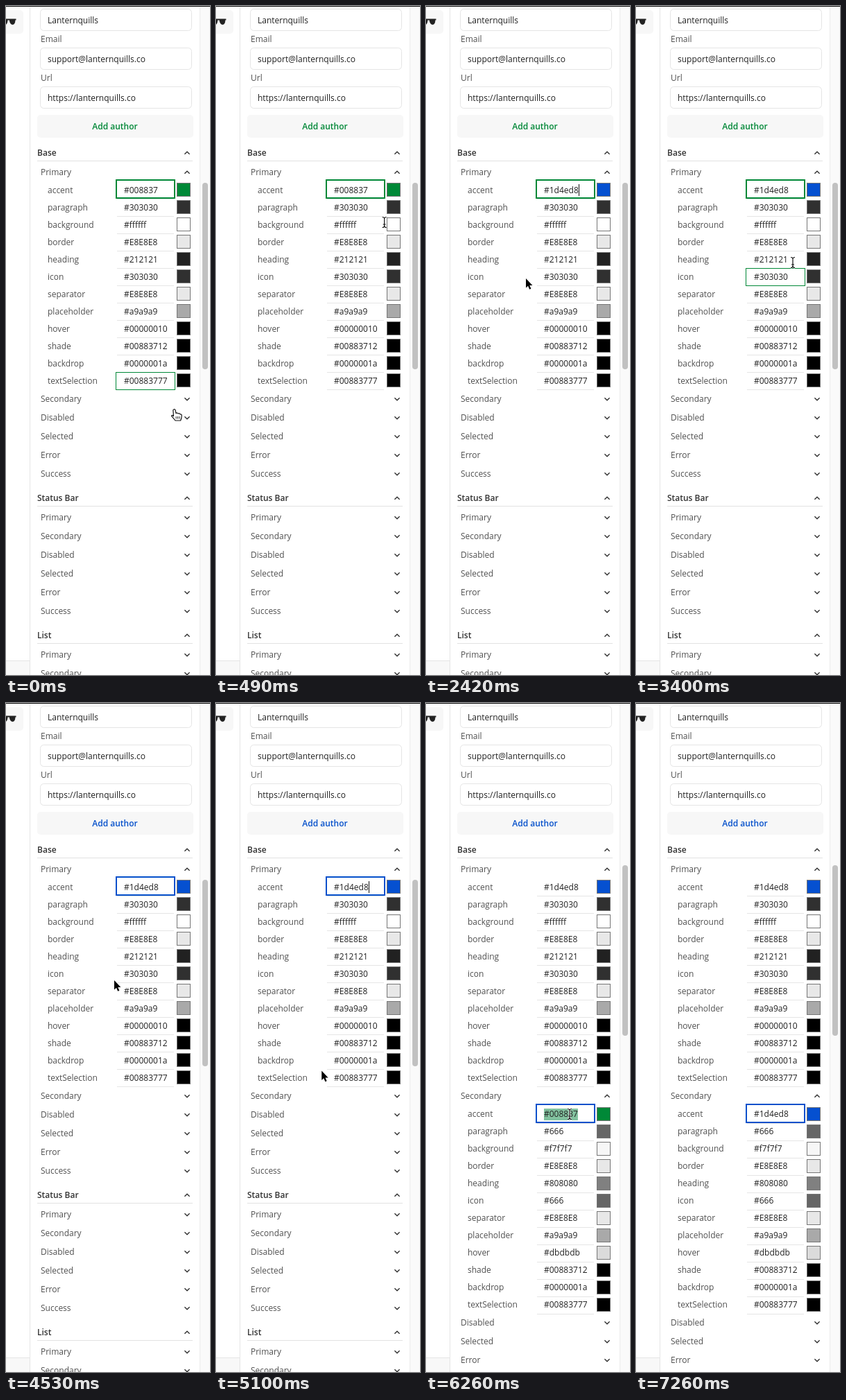
Recreate the animation shown at these times as an HTML page with a canvas. Size 294 px wide and 965 px high, loop 7.83 s.

```html
<!DOCTYPE html>
<html lang="en">
<head>
<meta charset="utf-8">
<title>Theme editor</title>
<style>
html, body { margin: 0; width: 100%; height: 100%; overflow: hidden; background: #fff; }
canvas { display: block; width: 294px; height: 965px; }
</style>
</head>
<body>
<canvas id="stage"></canvas>
<script>
const W = 294, H = 965, LOOP = 7830, TICK = 80;
const canvas = document.getElementById('stage');
const ctx = canvas.getContext('2d');
const dpr = window.devicePixelRatio || 1;
canvas.width = W * dpr;
canvas.height = H * dpr;

const FONT = '"Open Sans", "Noto Sans", sans-serif';
const GREEN = '#008837', BLUE = '#0550cb', LINE = '#e5e5e5', SOFT = '#f7f7f7';
const PASTED = '#1d4ed8';

const KEYS = ['accent', 'paragraph', 'background', 'border', 'heading', 'icon',
  'separator', 'placeholder', 'hover', 'shade', 'backdrop', 'textSelection'];
const TAIL = ['#00883712', '#0000001a', '#00883777'];
const PRIMARY = ['#008837', '#303030', '#ffffff', '#E8E8E8', '#212121', '#303030',
  '#E8E8E8', '#a9a9a9', '#00000010', ...TAIL];
const SECONDARY = ['#008837', '#666', '#f7f7f7', '#E8E8E8', '#808080', '#666',
  '#E8E8E8', '#a9a9a9', '#dbdbdb', ...TAIL];
const STATES = ['Primary', 'Secondary', 'Disabled', 'Selected', 'Error', 'Success'];

// What the user does, in ms
const AT = {
  select: 820, paste: 2420, recolor: 4050, blur: 5110, open: 5190,
  focus2: 6020, select2: 6180, paste2: 6600
};

// Pointer strokes: first tick, last tick, end point
const START = [234, 500];
const STROKES = [
  [0, 0, 243, 582], [80, 330, 284, 400], [410, 570, 222, 268], [820, 900, 219, 292],
  [1320, 1320, 210, 340], [1400, 1490, 198, 395], [2000, 2080, 144, 393],
  [2760, 2920, 182, 418], [3000, 3080, 200, 386], [3240, 3320, 210, 387],
  [3400, 3400, 226, 370], [3490, 3720, 234, 386], [3890, 4130, 188, 444],
  [4210, 4290, 143, 416], [4460, 4530, 156, 400], [4610, 4610, 168, 412],
  [4860, 5110, 147, 570], [5690, 6020, 207, 593], [6770, 7010, 140, 645],
  [7090, 7260, -20, 600]
];

// Moves in whole ticks; back looks a fraction of a tick behind
function pointerAt(t, back = 0) {
  let from = START, pos = START;
  for (const [t0, t1, ...to] of STROKES) {
    const late = t - t0 + 6;
    if (late < 0) break;
    const n = Math.round((t1 - t0) / TICK) + 1;
    const gap = n > 1 ? (t1 - t0) / (n - 1) : TICK;
    const f = (Math.min(n, Math.floor(late / gap) + 1) - back) / n;
    pos = from.map((v, i) => v + (to[i] - v) * f);
    from = to;
  }
  return pos;
}

const rowY = i => 265 + 25 * i + (i < 12 ? 0 : 27.5);
const caretOn = age => Math.floor(age / 615) % 2 === 0;

function fieldAt([x, y], count) {
  if (x < 159 || x > 243) return -1;
  for (let i = 0; i < count; i++) if (Math.abs(y - rowY(i)) <= 12.5) return i;
  return -1;
}

function text(s, x, y, color = '#505050', weight = 400, align = 'left') {
  ctx.font = `${weight} 12px ${FONT}`;
  ctx.textAlign = align;
  ctx.fillStyle = color;
  ctx.fillText(s, x, y);
}

function rect(x, y, w, h, color) {
  ctx.fillStyle = color;
  ctx.fillRect(x, y, w, h);
}

function frame(x, y, w, h, color, width = 1) {
  ctx.strokeStyle = color;
  ctx.lineWidth = width;
  ctx.strokeRect(x + width / 2, y + width / 2, w - width, h - width);
}

function round(x, y, w, h, r, fill, stroke) {
  ctx.beginPath();
  ctx.roundRect(x, y, w, h, r);
  ctx.fillStyle = fill;
  ctx.fill();
  if (stroke) { ctx.strokeStyle = stroke; ctx.lineWidth = 1; ctx.stroke(); }
}

function chevron(y, up) {
  const d = up ? 1.8 : -1.8;
  ctx.beginPath();
  ctx.moveTo(257.4, y + d);
  ctx.lineTo(261, y - d);
  ctx.lineTo(264.6, y + d);
  ctx.strokeStyle = '#333';
  ctx.lineWidth = 1.4;
  ctx.stroke();
}

function group(name, y) {
  text(name, 45, y + 4, '#333', 600);
  chevron(y, true);
  rect(45, y + 11, 224, 1, '#e2e2e2');
}

function section(name, y, open) {
  text(name, 50, y + 4);
  chevron(y, open);
}

function glasses() {
  const lens = x => {
    ctx.moveTo(x, 19);
    ctx.lineTo(x + 9, 19);
    ctx.quadraticCurveTo(x + 9, 27, x + 5, 27);
    ctx.quadraticCurveTo(x + 1, 27, x, 19);
  };
  ctx.beginPath();
  ctx.rect(0, 18.5, 14.5, 2);
  lens(-6.5);
  lens(4.5);
  ctx.fillStyle = '#222';
  ctx.fill();
}

function backdrop(accent) {
  rect(0, 0, W, H, '#fff');
  round(-8, 6, 33, 34, 5, SOFT);
  glasses();
  rect(0, 944, 34, 21, '#f8f8f8');
  rect(0, 944, 34, 1, LINE);
  rect(34, 0, 1, H, LINE);
  rect(279, 0, 15, H, '#fafafa');
  rect(279, 0, 1, H, '#ebebeb');
  ['Lanternquills', 'support@lanternquills.co', 'https://lanternquills.co'].forEach((s, i) => {
    round(49.5, 4.5 + 56 * i, 218, 31, 5, '#fff', LINE);
    text(s, 60, 25 + 56 * i, '#212121');
  });
  text('Email', 50, 52);
  text('Url', 50, 108);
  round(45, 157, 225, 33, 5, SOFT);
  text('Add author', 157, 178, accent, 600, 'center');
  rect(0, 0, W, 1, '#111');
}

function field(i, value, o) {
  const y = Math.round(rowY(i)), base = Math.round(rowY(i) + 4.8);
  text(KEYS[i % 12], 60, base);
  rect(160, y + 13, 82, 1, LINE);
  if (o.focus) frame(158, y - 15, 86, 28, o.accent, 2);
  else if (o.hover) frame(158, y - 12, 86, 26, o.accent);
  if (o.selected) {
    ctx.font = `400 12px ${FONT}`;
    rect(170, y - 8, ctx.measureText(value).width, 17, '#82c29f');
  }
  text(value, 170, base, '#212121');
  if (o.caret) rect(220, y - 8, 1, 17, '#111');
  const color = value === PASTED ? '#0550d0' : value.length > 7 ? '#000' : value;
  rect(246, y - 10, 20, 20, color);
  frame(246, y - 10, 20, 20, '#767676');
}

function arrow() {
  ctx.beginPath();
  ctx.moveTo(0, 0);
  ctx.lineTo(0, 13.5);
  ctx.lineTo(3, 10.8);
  ctx.lineTo(5.2, 15.8);
  ctx.lineTo(7.4, 14.8);
  ctx.lineTo(5.3, 10);
  ctx.lineTo(9.4, 10);
  ctx.closePath();
  ctx.strokeStyle = '#fff';
  ctx.lineWidth = 1.8;
  ctx.stroke();
  ctx.fillStyle = '#000';
  ctx.fill();
}

function beam() {
  ctx.beginPath();
  for (const side of [-3, 3]) {
    ctx.moveTo(side, -7.5);
    ctx.quadraticCurveTo(0, -7.5, 0, -5);
    ctx.lineTo(0, 5);
    ctx.quadraticCurveTo(0, 7.5, side, 7.5);
  }
  ctx.moveTo(-2, 3);
  ctx.lineTo(2, 3);
  ctx.strokeStyle = '#fff';
  ctx.lineWidth = 2.6;
  ctx.stroke();
  ctx.strokeStyle = '#111';
  ctx.lineWidth = 1.2;
  ctx.stroke();
}

function hand() {
  ctx.beginPath();
  ctx.moveTo(-1.6, 8);
  ctx.lineTo(-2.2, 1);
  ctx.quadraticCurveTo(-0.3, -1.6, 1.2, 1);
  ctx.lineTo(2, 5.5);
  ctx.quadraticCurveTo(4.2, 4.2, 5, 6);
  ctx.quadraticCurveTo(7.2, 5, 8, 7);
  ctx.quadraticCurveTo(10.4, 6.6, 10.2, 9);
  ctx.quadraticCurveTo(10.2, 12.5, 8.6, 16);
  ctx.lineTo(1, 16);
  ctx.quadraticCurveTo(-1.5, 12.5, -4.4, 9.6);
  ctx.quadraticCurveTo(-4.4, 7.2, -1.6, 9.6);
  ctx.closePath();
  ctx.fillStyle = '#fff';
  ctx.fill();
  ctx.strokeStyle = '#111';
  ctx.lineWidth = 1.2;
  ctx.stroke();
  ctx.beginPath();
  for (let x = 2.2; x < 8; x += 2.4) {
    ctx.moveTo(x, 10);
    ctx.lineTo(x, 13.5);
  }
  ctx.lineWidth = 0.9;
  ctx.stroke();
}

function pointer(pos, open, count) {
  const [x, y] = pos;
  const overSection = y > 553 && (!open || y < 580);
  ctx.save();
  ctx.translate(x, y);
  ctx.lineJoin = 'round';
  (overSection ? hand : fieldAt(pos, count) >= 0 ? beam : arrow)();
  ctx.restore();
}

function render(t) {
  const accent = t < AT.recolor ? GREEN : BLUE;
  const open = t >= AT.open;
  const focus = t < AT.blur ? 0 : t >= AT.focus2 ? 12 : -1;
  const shift = open ? 300 : 0;

  ctx.setTransform(dpr, 0, 0, dpr, 0, 0);
  backdrop(accent);
  group('Base', 212);
  section('Primary', 240, true);
  STATES.slice(1).forEach((s, i) =>
    section(s, 567 + 27 * i + (i ? shift : 0), i === 0 && open));
  ['Status Bar', 'List'].forEach((name, g) => {
    const y = 710 + 198 * g + shift;
    group(name, y);
    STATES.forEach((s, i) => section(s, y + 28 + 27 * i, false));
  });

  const values = open ? PRIMARY.concat(SECONDARY) : PRIMARY.slice();
  if (t >= AT.paste) values[0] = PASTED;
  if (t >= AT.paste2) values[12] = PASTED;
  const hover = fieldAt(pointerAt(t, 0.5), values.length);
  const selected = t >= AT.select && t < AT.paste || t >= AT.select2 && t < AT.paste2;
  values.forEach((v, i) => field(i, v, {
    accent,
    focus: i === focus,
    hover: i === hover,
    selected: i === focus && selected,
    caret: i === focus && v === PASTED && caretOn(t - (i ? AT.paste2 : AT.paste))
  }));

  if (open) round(283, 234, 8, 246, 4, '#c1c1c1');
  else round(283, 255, 8, 269, 4, '#c1c1c1');
  pointer(pointerAt(t), open, values.length);
}

function loop() {
  render(performance.now() % LOOP);
  requestAnimationFrame(loop);
}
loop();
</script>
</body>
</html>
```
